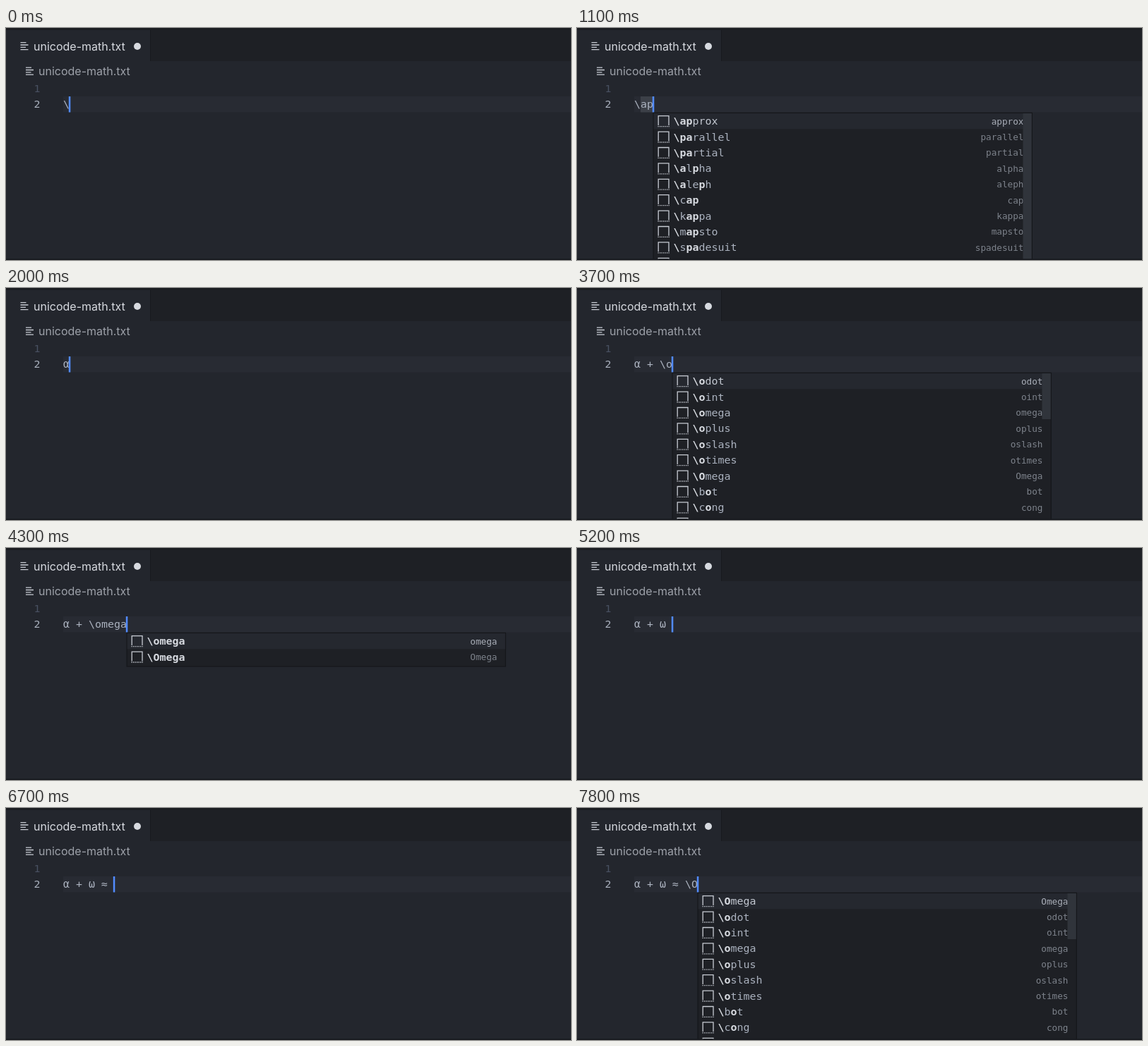
Recreate the animation shown at these times as an HTML page. Size 800 px wide and 329 px high, loop 8 s.

```html
<!DOCTYPE html>
<html lang="en">
<head>
<meta charset="utf-8">
<title>Unicode completion</title>
<style>
  html, body { margin: 0; width: 100%; height: 100%; overflow: hidden; background: #23262d; }
  svg { display: block; }
  text { white-space: pre; }
  .ui { font: 16px Inter, sans-serif; }
  .code { font: 14.95px "DejaVu Sans Mono", monospace; fill: #abb2bf; }
  .detail { font: 12.7px "DejaVu Sans Mono", monospace; fill: #7d828b; text-anchor: end; }
  .match { font-weight: 700; fill: #d7dae0; }
  .picked .code { fill: #c3c8d1; }
  .picked .detail { fill: #a9aeb8; }
  .num { text-anchor: end; }
  .lines, .icon path { fill: none; stroke: #c8ccd4; stroke-width: 1.3; }
</style>
</head>
<body>
<svg width="800" height="329" viewBox="0 0 800 329">
  <defs>
    <path id="doc" class="lines" d="M0 .7h8M0 4h11M0 7.3h7.5M0 10.6h11"/>
    <g id="snippet" class="icon">
      <path d="M.7 14V.7h14.8V14"/>
      <path d="M0 15.6h16.2" stroke-dasharray="1.3 1.2"/>
    </g>
  </defs>
  <rect width="800" height="329" fill="#23262d"/>
  <rect width="800" height="47" fill="#1e2025"/>
  <rect y="3" width="204" height="44" fill="#23262d"/>
  <rect width="800" height="3" fill="#1b1d21"/>
  <rect x="204" y="3" width="1" height="44" fill="#181a1f"/>
  <use href="#doc" x="20.5" y="20"/>
  <text class="ui" x="39" y="32" fill="#d7dae0">unicode-math.txt</text>
  <circle cx="186" cy="26" r="5" fill="#d7dae0"/>
  <use href="#doc" x="28" y="55.5"/>
  <text class="ui" x="46" y="67" fill="#9da1a9">unicode-math.txt</text>
  <rect x="81" y="97" width="719" height="22.5" fill="#282b33"/>
  <text class="code num" x="48.5" y="91" style="fill:#495162">1</text>
  <text class="code num" x="48.5" y="113.3">2</text>
  <rect id="word" x="90" y="97" width="18" height="22.5" fill="#3c4048"/>
  <text id="line" class="code" x="81" y="113.3"></text>
  <rect id="caret" y="97" width="2.5" height="22.5" fill="#528bff"/>
  <g id="popup"></g>
  <rect y="327.3" width="800" height="1.7" fill="#181a1f"/>
</svg>
<script>
const LOOP = 8000, LEFT = 81, CHAR = 9, ROW = 22.4;

// Editor content from each time on
const steps = [
  [0, '\\'], [400, '\\a'], [600, '\\ap'], [1200, '\\a'], [1300, '\\al'],
  [1500, '\\alp'], [1600, '\\alph'], [1700, '\\alpha'], [2000, 'α'],
  [2300, 'α '], [2600, 'α +'], [2900, 'α + '], [3300, 'α + \\'],
  [3700, 'α + \\o'], [3900, 'α + \\om'], [4000, 'α + \\ome'],
  [4200, 'α + \\omeg'], [4300, 'α + \\omega'], [4600, 'α + ω'],
  [4900, 'α + ω '], [5300, 'α + ω \\'], [5500, 'α + ω \\a'],
  [5600, 'α + ω \\ap'], [5800, 'α + ω \\app'], [5900, 'α + ω \\appr'],
  [6000, 'α + ω \\appro'], [6100, 'α + ω \\approx'], [6400, 'α + ω ≈'],
  [6600, 'α + ω ≈ '], [7100, 'α + ω ≈ \\'], [7700, 'α + ω ≈ \\O']
];

const omegas = 'omega Omega', rest = 'odot oint omega oplus oslash otimes';
const lists = {
  a: 'aleph alpha amalg angle approx ast asymp bigcap cap diamond',
  ap: 'approx parallel partial alpha aleph cap kappa mapsto spadesuit bigcap',
  app: 'approx kappa', appr: 'approx', appro: 'approx', approx: 'approx',
  al: 'aleph alpha amalg angle forall lambda natural nabla parallel partial',
  alp: 'alpha aleph', alph: 'alpha aleph', alpha: 'alpha',
  o: rest + ' Omega bot cong coprod', O: 'Omega ' + rest + ' bot cong coprod',
  om: omegas, ome: omegas, omeg: omegas, omega: omegas
};
const thumbs = { a: 50, ap: 220, al: 130, o: 65, O: 65 };

const $ = id => document.getElementById(id);
const box = (x, y, w, h, fill) => `<rect x="${x}" y="${y}" width="${w}" height="${h}" fill="${fill}"/>`;

// Each typed letter marks its first free occurrence
function label(name, typed) {
  const hit = new Set();
  for (const c of typed.toLowerCase()) {
    const i = [...name.toLowerCase()].findIndex((d, k) => d === c && !hit.has(k));
    if (i >= 0) hit.add(i);
  }
  const letters = [...name].map((c, i) => hit.has(i) ? `<tspan class="match">${c}</tspan>` : c);
  return '<tspan class="match">\\</tspan>' + letters.join('');
}

function popup(typed, x) {
  const names = lists[typed].split(' ');
  const h = names.length * ROW + 4;
  let out = box(x, 119.8, 537.5, h, '#15171b') + box(x + 1.2, 121, 535, h - 2.4, '#1e2025')
    + box(x + 1.2, 121, 535, ROW, '#25282f');
  names.forEach((name, i) => {
    const y = 121 + i * ROW;
    out += `<g${i ? '' : ' class="picked"'}><use href="#snippet" x="${x + 7}" y="${y + 3}"/>`
      + `<text class="code" x="${x + 29}" y="${y + 16.2}">${label(name, typed)}</text>`
      + `<text class="detail" x="${x + 525}" y="${y + 15.5}">${name}</text></g>`;
  });
  if (thumbs[typed]) out += box(x + 524, 121, 12.2, thumbs[typed], '#30343b');
  return out;
}

let shown;
function frame(now) {
  const t = now % LOOP;
  const text = steps.findLast(s => s[0] <= t)[1];
  $('word').style.display = t >= 900 && t < 1200 ? '' : 'none';
  if (text !== shown) {
    shown = text;
    const x = LEFT + CHAR * text.length;
    const typed = text.split('\\')[1];
    $('line').textContent = text;
    $('caret').setAttribute('x', x - 1.2);
    $('popup').innerHTML = typed ? popup(typed, x - .5) : '';
  }
  requestAnimationFrame(frame);
}
frame(performance.now());
</script>
</body>
</html>
```
